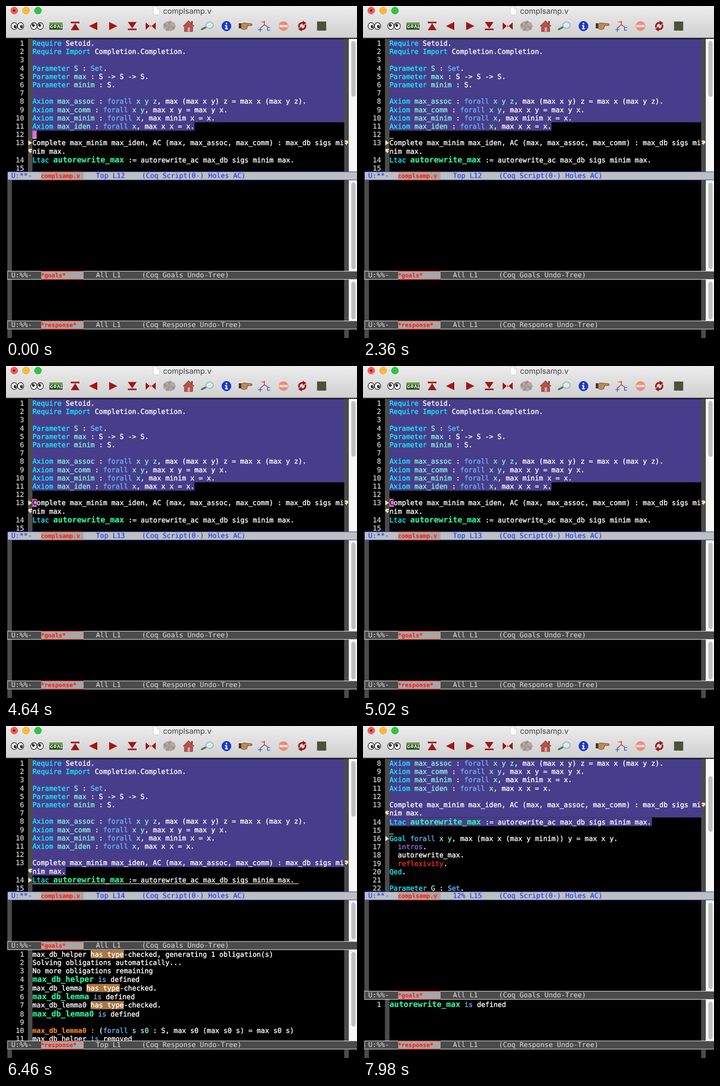
These frames come from a looping animation (769x728 px, 8 s). An HTML page:

```html
<!DOCTYPE html>
<html lang="en">
<head>
<meta charset="utf-8">
<title>complsamp.v</title>
<style>
html, body { margin: 0; width: 100%; height: 100%; overflow: hidden; background: #000; }
svg { display: block; width: 769px; height: 728px; }
text {
  font-family: "DejaVu Sans Mono", monospace; font-size: 15.12px; white-space: pre;
  text-rendering: geometricPrecision; color: #fff;
}
text, tspan { fill: currentColor; stroke: currentColor; stroke-width: .42px; }
.num { color: #c4c4c4; text-anchor: end; }
.k { color: #10f0ff; }
.v { color: #86f5dc; }
.t { color: #66b4f6; }
.f { color: #2cf9a2; font-weight: bold; font-size: 17.2px; stroke-width: .15px; }
.o { color: #ff8c1e; font-weight: bold; stroke-width: .15px; }
.p { color: #9370db; }
.r { color: #ff2a1c; }
.buf { color: #ff1c10; font-weight: bold; font-size: 12.95px; stroke-width: .1px; }
.mode { stroke-width: .15px; }
.title { font: 16.8px Inter, sans-serif; color: #414141; text-anchor: middle; stroke: none; }
</style>
</head>
<body>
<svg id="stage" viewBox="0 0 769 728">
  <defs>
    <linearGradient id="bar" x2="0" y2="1">
      <stop offset="0" stop-color="#ececec"/><stop offset="1" stop-color="#d0d0d0"/>
    </linearGradient>
  </defs>
  <rect width="769" height="728"/>
  <rect width="769" height="70" fill="url(#bar)"/>
  <rect y="69" width="769" height="1.5" fill="#8c8c8c"/>
  <g stroke-width="1">
    <circle cx="18" cy="10" r="7.6" fill="#fc5b57" stroke="#df443f"/>
    <circle cx="18" cy="10" r="2.4" fill="#6d0704"/>
    <circle cx="44" cy="10" r="7.6" fill="#fdbc2e" stroke="#dfa023"/>
    <circle cx="70" cy="10" r="7.6" fill="#2ac83f" stroke="#1eac2c"/>
  </g>
  <path d="M322.500 1.500h9l5 5v13h-14z" fill="#fcfcfc" stroke="#c9c9c9"/>
  <path d="M331.500 1.500v5h5" fill="none" stroke="#c9c9c9"/>
  <text class="title" x="397" y="16.6">complsamp.v</text>
  <g id="icons"></g>
  <g id="views"></g>
  <g id="caret">
    <rect id="block" x="58" width="9.300" height="17.500" fill="#da70d6"/>
    <text id="glyph" x="58" style="color:#1c0a20"></text>
  </g>
  <rect id="rule" x="58" height="1.300" fill="#f2f2d8"/>
  <g id="top"></g>
</svg>
<script>
const $ = id => document.getElementById(id);
const CW = 9.103, BOLD_CW = 10.355, ROW = 18.2, LEFT = 58;
const LOOP = 8000, STEP = 4600, CHECKED = 5060, DONE = 7000;

const rect = (x, y, w, h, fill, extra = '') =>
  `<rect x="${x}" y="${y}" width="${w}" height="${h}" fill="${fill}" ${extra}/>`;
const path = (d, fill, extra = '') => `<path d="${d}" fill="${fill}" ${extra}/>`;
const ring = (x, y, rx, ry, fill, extra = '') =>
  `<ellipse cx="${x}" cy="${y}" rx="${rx}" ry="${ry}" fill="${fill}" ${extra}/>`;
const text = (x, y, s, cls = '') => `<text x="${x}" y="${y}" class="${cls}">${s}</text>`;
const esc = s => s.replace(/>/g, '&gt;');

// Lines carry styled runs written as ~<class><text>~; "+" marks a wrapped line.
const script = [
  '~kRequire~ Setoid.', '~kRequire~ ~kImport~ Completion.Completion.', '',
  '~kParameter~ ~vS~ : ~tSet~.', '~kParameter~ ~vmax~ : S -> S -> S.', '~kParameter~ ~vminim~ : S.', '',
  '~kAxiom~ ~vmax_assoc~ : ~tforall~ ~vx y z~, max (max x y) z = max x (max y z).',
  '~kAxiom~ ~vmax_comm~ : ~tforall~ ~vx y~, max x y = max y x.',
  '~kAxiom~ ~vmax_minim~ : ~tforall~ ~vx~, max minim x = x.',
  '~kAxiom~ ~vmax_iden~ : ~tforall~ ~vx~, max x x = x.', '',
  'Complete max_minim max_iden, AC (max, max_assoc, max_comm) : max_db sigs mi', '+nim max.',
  '~kLtac~ ~fautorewrite_max~ := autorewrite_ac max_db sigs minim max.', '',
  '~kGoal~ ~tforall~ ~vx y~, max (max x (max y minim)) y = max x y.',
  '  ~pintros~.', '  autorewrite_max.', '  ~rreflexivity~.', '~kQed~.', '',
  '~kParameter~ ~vG~ : ~tSet~.'
];
const checked = [
  'max_db_helper ~hhas type~-checked, generating 1 obligation(s)',
  'Solving obligations automatically...', 'No more obligations remaining',
  '~fmax_db_helper~ ~tis~ defined', 'max_db_lemma ~hhas type~-checked.',
  '~fmax_db_lemma~ ~tis~ defined', 'max_db_lemma0 ~hhas type~-checked.',
  '~fmax_db_lemma0~ ~tis~ defined', '',
  '~omax_db_lemma0 :~ (~tforall~ ~vs s0~ : S, max s0 (max s0 s) = max s0 s)',
  'max_db_helper ~tis~ removed'
];

function codeLine(line, y) {
  let x = LEFT, back = '', runs = '';
  line.split('~').forEach((part, i) => {
    const cls = i % 2 ? part[0] : '', s = i % 2 ? part.slice(1) : part;
    const w = s.length * (cls === 'f' ? BOLD_CW : CW);
    if (cls === 'h') back += rect(x, y - 14, w, 18, '#a87742');
    runs += `<tspan class="${cls}">${esc(s)}</tspan>`;
    x += w;
  });
  return back + text(LEFT, y, runs);
}

function listing(lines, y, first, extra) {
  let out = '', n = first;
  for (const line of lines) {
    if (line.includes('~f')) y += extra;
    const wrapped = line[0] === '+';
    if (!wrapped) out += text(39.5, y, n++, 'num');
    out += codeLine(wrapped ? line.slice(1) : line, y);
    y += ROW;
  }
  return out;
}

function fringes(y, h, left) {
  return rect(left, y, 10, h, '#4b4b4b') + rect(741, y, 10, h, '#4b4b4b');
}

function scrollbar(y, h, from, to) {
  return rect(751, y, 18, h, '#f7f7f7') + rect(756.5, from, 9.5, to - from, '#c0c0c0', 'rx="4.700"');
}

const PEACH = '#ffe2b0';
const pointer = y => path(`M49 ${y - 5.5}l8 5.500l-8 5.500z`, PEACH);
const wrapMarks = y =>
  path(`M742 ${y - 5}h5q3 0 3 4q0 3-3 3v3l-5-4l5-4v2q1 0 0-1h-5z`, PEACH) +
  path(`M57 ${y + 13}h-5q-3 0-3 4q0 3 3 3v3l5-4l-5-4v2q-1 0 0-1h5z`, PEACH);

function modeLine(y, buffer, place, mode, active) {
  const color = active ? '#1838f4' : '#d2d2d2';
  const label = (x, s, id = '') => `<text class="mode" x="${x}" y="${y + 14.2}" style="color:${color}" ${id}>${s}</text>`;
  return rect(3.5, y + .5, 770, 18, active ? '#bfbfbf' : '#4b4b4b',
      `stroke="${active ? '#2446c8' : '#e4e4e4'}" stroke-width="1.200"`) +
    rect(77, y + 1, 93, 17, '#a6a6a6') +
    rect(77, y, 93, 1.3, '#ff2a1c') + rect(77, y + 17.8, 93, 1.3, '#ff2a1c') +
    label(11.5, active ? 'U:**-' : 'U:%%-') + text(76.5, y + 14, buffer, 'buf') +
    label(197, place, active ? 'id="place"' : '') + label(297.5, mode);
}

const LOCK = '#483d8b';
function view(s) {
  const scrolled = s === 2, split = s === 1 ? 472 : 581, shown = scrolled ? script.slice(7) : script.slice(0, 16);
  const full = [182.5, 237, 128][s], tail = [[355, 18.3], [73, 18.3], [575, 19]][s];
  const wrapY = scrolled ? 173 : 300;
  let out = fringes(72, 291, 48) + rect(LEFT, 72.5, 683, full, LOCK) +
    rect(LEFT, 72.5 + full, tail[0], tail[1], LOCK) +
    listing(shown, 87, scrolled ? 8 : 1, 1.2) + wrapMarks(wrapY) + pointer([300, 338, 247][s]) +
    (scrolled ? scrollbar(72, 291, 110, 232) : scrollbar(72, 291, 77, 199));
  out += fringes(381, split - 381, 3) + scrollbar(382, split - 382, 387, split - 4);
  const top = split + 19;
  out += fringes(top, 690 - top, s ? 48 : 3) + scrollbar(top, 690 - top, top + 4.5, s === 1 ? 659 : 687);
  if (s === 1) out += listing(checked, 505.5, 1, 1.2);
  if (s === 2) out += listing(['~fautorewrite_max~ ~tis~ defined'], 615, 1, 1);
  out += modeLine(split, '*goals*', 'All L1', '(Coq Goals Undo-Tree)') +
    modeLine(690, '*response*', s === 1 ? 'Top L1' : 'All L1', '(Coq Response Undo-Tree)');
  return `<g>${out}</g>`;
}

function toolbar() {
  const red = '#a31515', dark = 'stroke="#222" stroke-width="1.400"';
  const eyes = (x, dx, dy) => [-7, 7].map(o =>
    ring(x + o, 44, 6.8, 7.5, '#fff', dark) + ring(x + o + dx, 44 + dy, 3, 3.4, '#111') +
    ring(x + o + dx + 1, 43 + dy, 1, 1, '#fff')).join('');
  const line = (d, color, w) => path(d, 'none', `stroke="${color}" stroke-width="${w}" stroke-linecap="round"`);
  let blobs = '';
  for (let i = 0; i < 9; i++) {
    const a = i * Math.PI * 2 / 9;
    blobs += ring(358 + 9 * Math.cos(a), 44 + 7 * Math.sin(a), 5, 4.5, i % 2 ? '#a1958f' : '#b3aaa5');
  }
  return eyes(25, 2, 1) + eyes(68, -1, -2) +
    rect(95, 36, 29, 16, '#29542a') + rect(95, 36, 29, 5, '#6f9a4c') +
    line('M101 42q-5 2-3 5q4 2 4-2M107 42q-4 5 1 5q4-4-1-5M113 48l2-6l3 6M121 41v7h2', '#e3ebcf', 1.8) +
    rect(142, 34.5, 19, 3.4, red) + path('M151.500 38l9.500 15h-19z', red) +
    path('M182 44l18-9v18z', red) + path('M244 44l-18-9v18z', red) +
    rect(267, 49.5, 19, 3.4, red) + path('M276.500 49l9.500-14h-19z', red) +
    path('M306 36l9 8l-9 8zM328 36l-9 8l9 8z', red) + rect(316.3, 42.5, 1.6, 3, red) +
    ring(358, 44, 12, 9, '#aaa09a') + blobs +
    path('M388 44l12-12l12 12h-3v12h-18v-12z', '#b5534d', 'stroke="#8a3632"') + rect(406, 33, 3, 7, '#8a3632') +
    rect(398, 47, 5, 9, '#e1a59e') +
    line('M429 51l8-4', '#507052', 4) + ring(446, 42, 8, 7, '#d8eef0', 'stroke="#8ba7a9" stroke-width="1.600"') +
    ring(483, 44, 10, 10.5, '#1739d8', 'stroke="#0c219a"') + ring(483, 38.5, 1.8, 1.8, '#fff') +
    path('M479.500 42h5v7h2v2h-7v-2h2v-5h-2z', '#fff') +
    path('M515 39q6-3 12-1l11 1q3 2 0 4h-10q3 2 0 4q1 3-3 4q-5 2-10-2z', '#c08b5a', 'stroke="#5f3c20"') +
    rect(510, 38, 5, 11, '#453329') +
    line('M566 33v8l-8 7M566 41l7 5', red, 1.3) + line('M560 35h6', '#d83030', 1.3) +
    line('M557 48v8M553 52h8M573 46v8M573 47h5M573 53h5', '#2a55d8', 1.4) +
    ring(608, 44, 10.5, 10.5, '#ee8a7e') + rect(599, 41.5, 18, 5, '#f7ddd8') +
    line('M642 46q-1-9 8-9M656 42q1 9-8 9', red, 3.6) + path('M650 32l8 5.500l-8 5zM648 56l-8-5.500l8-5z', red) +
    rect(681.500, 34, 20, 20, '#4a5138');
}

$('icons').innerHTML = toolbar();
$('views').innerHTML = [0, 1, 2].map(view).join('');
$('top').innerHTML = modeLine(363, 'complsamp.v', 'Top L12', '(Coq Script(0-) Holes AC)', true) +
  fringes(709.5, 19, 3);

// Each cue: start time, view, line label, baseline, character under the caret, rule width, blink origin.
const cues = [
  { at: 0, view: 0, place: 'Top L12', y: 287.2, char: '', rule: 9, blink: -300 },
  { at: STEP, view: 0, place: 'Top L13', y: 305.4, char: 'C', rule: 0, blink: STEP },
  { at: CHECKED, view: 1, place: 'Top L14', y: 343, char: 'L', rule: 583, blink: 4900 },
  { at: DONE, view: 2, place: '12% L15', y: 233.8, char: '', rule: 9, blink: DONE }
];

function render(t) {
  const cue = cues.filter(c => c.at <= t).pop();
  [...$('views').children].forEach((g, i) => g.style.display = i === cue.view ? '' : 'none');
  $('place').textContent = cue.place;
  $('caret').style.display = (t - cue.blink) % 1000 < 500 ? '' : 'none';
  $('block').setAttribute('y', cue.y - 14);
  $('glyph').setAttribute('y', cue.y);
  $('glyph').textContent = cue.char;
  $('rule').setAttribute('y', cue.y + 2.2);
  $('rule').setAttribute('width', cue.rule);
}

const start = performance.now();
function tick() {
  render((performance.now() - start) % LOOP);
  requestAnimationFrame(tick);
}
tick();
</script>
</body>
</html>
```
